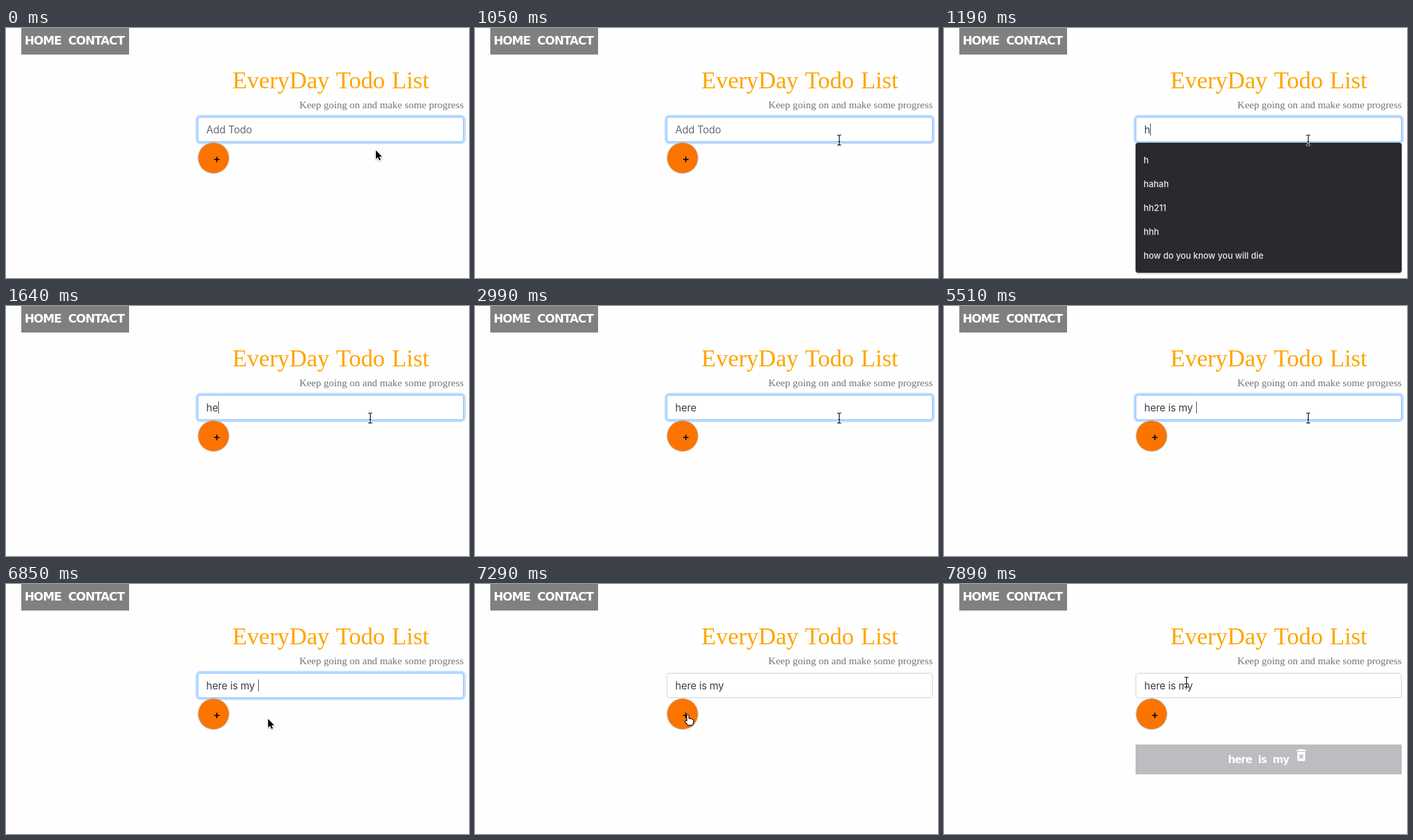
An HTML page that plays this animation: 696 by 377 pixels, repeating every 8 s.

```html
<!DOCTYPE html>
<html lang="en">
<head>
<meta charset="utf-8">
<title>Todo list</title>
<style>
  html, body { margin: 0; width: 100%; height: 100%; overflow: hidden; background: #fefefe; }
  svg { display: block; width: 696px; height: 377px; }
  text { white-space: pre; }
  .serif { font-family: "Liberation Serif", serif; }
  .title { font-size: 36.3px; letter-spacing: -.15px; word-spacing: 1.6px; fill: #ffa500; }
  .sans { font-family: Inter, Roboto, sans-serif; }
  .tech { font-family: "DejaVu Sans", sans-serif; font-weight: 700; fill: #fff; }
  .nav { font-size: 17.6px; letter-spacing: -1.1px; }
  .field { font-size: 15.4px; letter-spacing: -.2px; }
  .menu { font-size: 12.9px; font-weight: 500; fill: #e8eaed; }
  .task { font-size: 15.5px; letter-spacing: -1px; word-spacing: 5px; }
</style>
</head>
<body>
<svg viewBox="0 0 696 377">
  <defs>
    <filter id="soft" x="-50%" y="-50%" width="200%" height="200%">
      <feDropShadow dx="0" dy="1" stdDeviation="1" flood-opacity=".35"/>
    </filter>
    <path id="beamLine" d="M-3-7.5H-1.5Q0-7.5 0-6V6Q0 7.5-1.5 7.5H-3M3-7.5H1.5Q0-7.5 0-6M0 6Q0 7.5 1.5 7.5H3M-1.5 2.5H1.5"/>
  </defs>
  <rect width="696" height="377" fill="#fefefe"/>

  <rect x="23" width="162" height="40" fill="#808080"/>
  <text class="tech nav" x="28" y="25.3">HOME</text>
  <text class="tech nav" x="93.5" y="25.3">CONTACT</text>

  <text class="serif title" x="488" y="91" text-anchor="middle">EveryDay Todo List</text>
  <text class="serif" x="688" y="121" font-size="15.45" text-anchor="end" fill="#747474">Keep going on and make some progress</text>

  <rect id="glow" x="285" y="131" width="406" height="44" rx="7" fill="#bfdeff"/>
  <rect id="box" x="288.5" y="134.5" width="399" height="37" rx="3.5" fill="#fff"/>
  <text id="entry" class="sans field" x="301" y="159"></text>
  <rect id="caret" y="144" width="1" height="18" fill="#495057"/>

  <circle cx="312" cy="196" r="23.3" fill="#fb7400" stroke="#bfc3c7"/>
  <text class="sans" x="317" y="203" font-size="17" font-weight="500" text-anchor="middle">+</text>

  <g id="menu">
    <rect x="288" y="173" width="400" height="196" rx="4" fill="#292a2d" filter="url(#soft)"/>
  </g>

  <g id="task">
    <rect x="288" y="242" width="400" height="45" fill="#bcbdc1"/>
    <text class="tech task" x="427" y="270">here is my</text>
    <g transform="translate(525 246)">
      <path d="M6 7H18V19a2 2 0 0 1-2 2H8a2 2 0 0 1-2-2zM5 4H8.5l1-1h5l1 1H19V6H5z" fill="#fff"/>
      <path d="M9.2 11.2l5.6 5.6m0-5.6l-5.6 5.6" stroke="#bcbdc1" stroke-width="2"/>
    </g>
  </g>

  <g id="arrow" filter="url(#soft)">
    <path d="M0 .5V13.5L3 10.7 5.1 15.4 7.2 14.4 5.2 10H9.2z" stroke="#fff" stroke-width="1.6" paint-order="stroke"/>
  </g>
  <g id="beam" fill="none">
    <use href="#beamLine" stroke="#fff" stroke-width="2.6"/>
    <use href="#beamLine" stroke="#000" stroke-width="1.05"/>
  </g>
  <g id="hand" filter="url(#soft)">
    <path d="M-1.5 1Q0-1 1.5 1V6Q3 5 4 6.5 5.5 5.7 6.5 7.2 8.5 6.7 8.5 9V12L7 16H0L-4.3 10Q-4.5 8-2.5 8.8L-1.5 10z" fill="#fff" stroke="#000"/>
  </g>
</svg>
<script>
const LOOP = 8000;
const PHRASE = "here is my ";
const el = id => document.getElementById(id);
const show = (id, on) => el(id).setAttribute("visibility", on ? "visible" : "hidden");

// [start ms, typed characters, caret x or 0 while blinked off]
const typing = [
  [0, 0, 0], [600, 0, 301], [1050, 0, 0], [1190, 1, 310], [1640, 2, 319],
  [2090, 2, 0], [2240, 3, 325], [2390, 4, 333], [2990, 4, 0], [3430, 5, 338],
  [3880, 6, 342], [4030, 7, 349], [4330, 8, 353], [4630, 9, 367], [5220, 9, 0],
  [5360, 10, 375], [5510, 11, 379], [6110, 11, 0], [6560, 11, 379], [7150, 11, 0]
];

// [start ms, cursor shape, x, y]
const pointer = [
  [0, "arrow", 556, 184], [150, "arrow", 551, 177], [300, "beam", 547.5, 169],
  [6700, "arrow", 482, 190], [6850, "arrow", 394, 203], [7000, "arrow", 346, 203],
  [7150, "hand", 320, 197], [7740, "arrow", 342, 180], [7890, "beam", 364.5, 148]
];

const stepAt = (steps, t) => steps.findLast(s => s[0] <= t);

["h", "hahah", "hh211", "hhh", "how do you know you will die"].forEach((label, i) => {
  const row = document.createElementNS("http://www.w3.org/2000/svg", "text");
  row.setAttribute("class", "sans menu");
  row.setAttribute("x", 300);
  row.setAttribute("y", 204 + 36 * i);
  row.textContent = label;
  el("menu").append(row);
});

function draw(t) {
  const [, count, caretX] = stepAt(typing, t);
  const [, shape, x, y] = stepAt(pointer, t);
  const focused = t < 7290;

  el("entry").textContent = count ? PHRASE.slice(0, count) : "Add Todo";
  el("entry").setAttribute("fill", count ? "#3a4046" : "#666e75");
  el("caret").setAttribute("x", caretX);
  show("caret", caretX > 0);

  show("glow", focused);
  el("box").setAttribute("stroke", focused ? "#80bdff" : "#ced4da");
  show("menu", t >= 1190 && t < 1640);
  show("task", t >= 7440);

  for (const id of ["arrow", "beam", "hand"]) show(id, id === shape);
  el(shape).setAttribute("transform", `translate(${x} ${y})`);
}

const start = performance.now();
function tick() {
  draw((performance.now() - start) % LOOP);
  requestAnimationFrame(tick);
}
tick();
</script>
</body>
</html>
```
